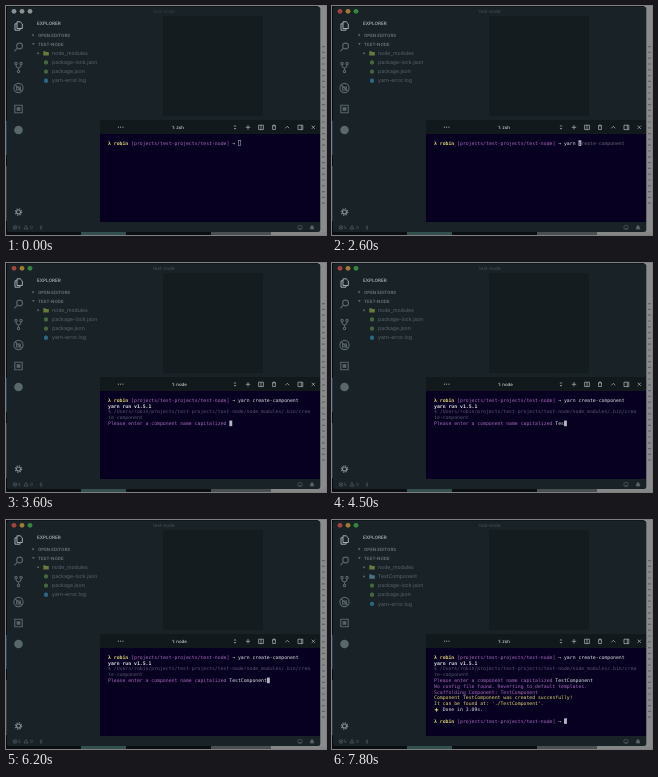
An HTML page that plays this animation: 320 by 229 pixels, repeating every 8000 ms.

```html
<!DOCTYPE html>
<html lang="en">
<head>
<meta charset="utf-8">
<title>Component generator</title>
<style>
html, body { margin: 0; width: 100%; height: 100%; overflow: hidden; background: #0b0e10; }
svg { display: block; width: 100vw; height: 100vh; }
text { font: 5.2px Inter, "Open Sans", sans-serif; text-rendering: geometricPrecision; white-space: pre; fill: #58656b; }
.head { font-size: 4.4px; font-weight: 600; fill: #6d787d; }
.bar { font-size: 4.4px; font-weight: 500; fill: #d0d2d3; }
#term text { font: 4.8px "DejaVu Sans Mono", "Liberation Mono", monospace; fill: #e4e4ec; }
.line { fill: none; stroke: #59666c; stroke-width: 1.1; }
.tool { fill: none; stroke: #b4b9bb; stroke-width: .7; }
</style>
</head>
<body>
<svg viewBox="0 0 320 229" preserveAspectRatio="none">
  <!-- desktop edges -->
  <rect x="312" width="8" height="229" fill="#8a8b8c"/>
  <path d="M317.5 40v160" stroke="#636668" stroke-width="3" stroke-dasharray="1.2 4.6"/>
  <path d="M0 115h2v34h-2z" fill="#1f3f55"/>
  <path d="M0 160h2v55h-2z" fill="#33393c"/>
  <path d="M75 227.5h45" stroke="#34504e" stroke-width="3"/>
  <path d="M205 227.5h60" stroke="#4a5052" stroke-width="3"/>
  <path d="M265 227.5h55" stroke="#858787" stroke-width="3"/>

  <!-- window -->
  <rect x="1" y=".5" width="313.3" height="225.5" rx="2.5" fill="#192327"/>
  <rect x="157" y="10" width="100" height="100" fill="#141c20"/>
  <g id="lights"></g>
  <text id="title" x="158" y="7" text-anchor="middle" style="font-size:4.7px;fill:#465157">test-node</text>

  <!-- activity bar -->
  <g class="line">
    <path d="M11 15.8h3.2l2.1 2.1v4.6h-5.3zM10.8 17.8h-1.8v6.4h5v-1.4" stroke="#b4babd" stroke-width=".9"/>
    <circle cx="13.6" cy="40" r="2.9"/><path d="M11.4 42.2L8.4 45.4"/>
    <circle cx="10" cy="57.6" r="1.2"/><circle cx="15" cy="57.6" r="1.2"/><circle cx="12.5" cy="65.4" r="1.2"/>
    <path d="M10 59q0 2.5 2.5 3q2.5-.5 2.5-3M12.5 62v2.2"/>
    <circle cx="12.5" cy="82" r="4.6"/><path d="M9.3 78.8l6.4 6.4M10.6 81h3.8v3h-3.8z"/>
    <path d="M8.8 99.3h7.4v7.4h-7.4z"/><path d="M11.2 101.7h2.6v2.6h-2.6z" fill="#59666c"/>
    <circle cx="12.5" cy="206" r="2" stroke="#858d91"/>
    <circle cx="12.5" cy="206" r="3.2" stroke="#858d91" stroke-dasharray="1.257 1.257"/>
  </g>
  <circle cx="12.5" cy="124" r="4.3" fill="#59666c"/>

  <!-- explorer -->
  <text class="head" x="31" y="18.9" style="font-size:4.6px;fill:#a1a9ad">EXPLORER</text>
  <path d="M26.5 27.8l1.8 1.3l-1.8 1.3zM26 37.3h2.8l-1.4 1.8z" fill="#6d787d"/>
  <text class="head" x="32" y="30.6">OPEN EDITORS</text>
  <text class="head" x="32" y="39.7">TEST-NODE</text>
  <g id="tree"></g>

  <!-- status bar -->
  <g class="line" style="stroke-width:.6">
    <circle cx="9" cy="221.5" r="1.8"/><path d="M8 220.5l2 2m0-2l-2 2"/>
    <path d="M18 223l2-3.6l2 3.6zM35.5 219l-1.5 2.7h2l-1.5 2.3"/>
    <circle cx="294" cy="221.5" r="2.2"/><path d="M292.8 222q1.2 1.5 2.4 0"/>
    <path d="M304 223h4l-.6-1v-1.2q-1.4-2.6-2.8 0v1.2z" fill="#59666c"/>
  </g>
  <text x="12" y="223.2" style="font-size:4.4px">5</text>
  <text x="24" y="223.2" style="font-size:4.4px">0</text>

  <!-- panel -->
  <rect x="94" y="114" width="220" height="14" fill="#12191d"/>
  <rect x="94" y="128" width="220" height="88" fill="#080020"/>
  <path d="M112.3 121.2h.1m2.2 0h.1m2.2 0h.1" stroke="#c8cccd" stroke-linecap="round"/>
  <text id="shell" class="bar" x="166" y="123"></text>
  <g class="tool">
    <path d="M228.2 120.6l.8-1.2l.8 1.2M228.2 122l.8 1.2l.8-1.2M239.8 121.3h4.4M242 119.1v4.4"/>
    <path d="M252.6 119.2h4.8v4.4h-4.8zM255 119.2v4.4M266 119.8h4M267.2 119.6v-.6h1.6v.6M266.6 120v3.5h2.8v-3.5"/>
    <path d="M279.3 122.3l2-2l2 2M292 119.2h4.8v4.4h-4.8zM295.3 119.2v4.4M305.7 119.7l3.2 3.2m0-3.2l-3.2 3.2"/>
  </g>
  <g id="term"></g>
</svg>
<script>
const LOOP = 8000, CHAR = 4.8 * 0.602, LINE = 5.82, LEFT = 102, TOP = 138.7;
const YELLOW = '#dcd270', PINK = '#a866bf', WHITE = '#dcdce4', DIM = '#55566c', GHOST = '#626371';
const $ = id => document.getElementById(id);
const prompt = [['λ robin ', YELLOW, 1], ['[projects/test-projects/test-node]', PINK], [' → ', WHITE]];
const command = 'yarn create-component', name = 'TestComponent';
const yarnKeys = [1600, 1700, 1800, 1900, 2000];
const nameKeys = [4200, 4400, 4500, 4600, 4900, 5300, 5400, 5600, 5700, 5800, 5900, 6000, 6100];
const typed = (keys, t) => keys.filter(k => t >= k).length;

// Each terminal line is a list of [text, colour, bold] runs.
function terminalLines(t) {
  const count = t >= 2700 ? command.length : typed(yarnKeys, t);
  const lines = [[...prompt, [command.slice(0, count), WHITE]]];
  if (t >= 2900) lines.push([]);
  if (t >= 3000) lines[1] = [['yarn run v1.5.1', WHITE, 1]];
  if (t >= 3200) lines.push(
    [['$ /Users/robin/projects/test-projects/test-node/node_modules/.bin/crea', DIM]],
    [['te-component', DIM]]);
  if (t >= 3400) lines.push([['Please enter a component name capitalized ', PINK],
    [name.slice(0, typed(nameKeys, t)), WHITE]]);
  if (t >= 6400) lines.push([]);
  if (t >= 6500) lines.splice(5, 1,
    [['No config file found. Reverting to default templates.', PINK]],
    [['Scaffolding Component: TestComponent', PINK]],
    [['Component TestComponent was created succesfully!', YELLOW]],
    [["It can be found at: './TestComponent'.", YELLOW]],
    [['   Done in 3.09s.', WHITE]], [], prompt);
  return lines;
}

function drawTerminal(t) {
  const lines = terminalLines(t), row = lines.length - 1;
  const column = lines[row].reduce((n, [text]) => n + text.length, 0);
  const x = LEFT + column * CHAR, y = TOP - 4.4 + row * LINE;
  let out = t < 900
    ? `<rect x="${x + .3}" y="${y + .3}" width="2.4" height="5" fill="none" stroke="#9a9aa8" stroke-width=".6"/>`
    : `<rect x="${x}" y="${y}" width="${CHAR}" height="5.6" fill="#b4b4c0"/>`;
  if (t >= 1600 && t < 2700) {
    const rest = command.slice(typed(yarnKeys, t));
    lines[0].push([rest[0], '#25213c'], [rest.slice(1), GHOST]);
  }
  lines.forEach((runs, i) => {
    const spans = runs.map(([text, color, bold]) =>
      `<tspan style="fill:${color};font-weight:${bold ? 700 : 400}">${text}</tspan>`).join('');
    out += `<text x="${LEFT}" y="${TOP + i * LINE}">${spans}</text>`;
  });
  if (t >= 6500) out += `<path d="M104.5 187.4l.6 1.8l1.8 .6l-1.8 .6l-.6 1.8l-.6-1.8l-1.8-.6l1.8-.6z" fill="${YELLOW}"/>`;
  $('term').innerHTML = out;
}

function drawTree(t) {
  const files = [['node_modules', '#6a7a3c', 1], ['package-lock.json', '#45663c'],
    ['package.json', '#45663c'], ['yarn-error.log', '#2b6685']];
  if (t >= 6800) files.splice(1, 0, ['TestComponent', '#4b7186', 1]);
  $('tree').innerHTML = files.map(([label, color, folder], i) => {
    const y = 47.3 + i * 9.15;
    const icon = folder
      ? `<path d="M31.5 ${y - 1.3}l1.8 1.3l-1.8 1.3z" fill="#6d787d"/>
         <path d="M37.3 ${y - 2.1}h2l.8 .8h2.7v3.5h-5.5z" fill="${color}"/>`
      : `<path d="M40 ${y - 2.4}l2 1.2v2.4l-2 1.2l-2-1.2v-2.4z" fill="${color}"/>`;
    return `${icon}<text x="46" y="${y + 1.7}">${label}</text>`;
  }).join('');
}

// The window buttons are grey until the window gains focus.
function drawWindow(t) {
  const colors = t < 900 ? Array(3).fill('#8c9193') : ['#a8423e', '#a07d33', '#35893f'];
  $('lights').innerHTML = colors.map((c, i) =>
    `<circle cx="${8 + 8 * i}" cy="5.3" r="2.4" fill="${c}"/>`).join('');
  $('title').setAttribute('opacity', t < 900 ? .6 : 1);
  $('shell').textContent = t >= 3000 && t < 6500 ? '1: node' : '1: zsh';
}

let last = -1;
function frame(now) {
  const t = Math.floor(now % LOOP / 100) * 100;
  if (t !== last) {
    last = t;
    drawWindow(t);
    drawTree(t);
    drawTerminal(t);
  }
  requestAnimationFrame(frame);
}
frame(performance.now());
</script>
</body>
</html>
```
